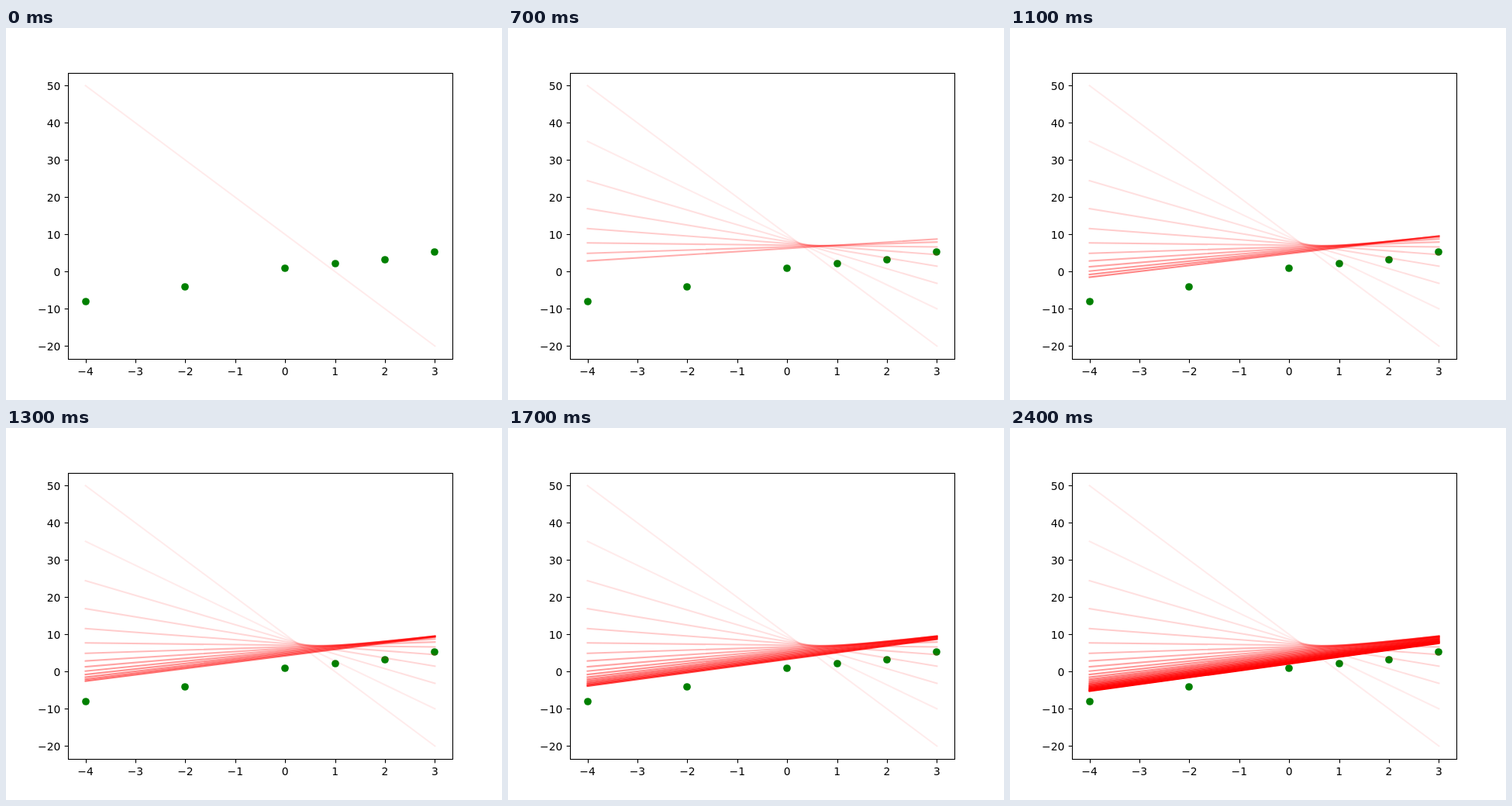
Recreate the animation shown at these times as an HTML page. Size 640x480 px, loop 2500 ms.

```html
<!DOCTYPE html>
<html lang="en">
<head>
<meta charset="utf-8">
<title>Line fit by gradient descent</title>
<style>
  html, body { margin: 0; width: 100%; height: 100%; overflow: hidden; background: #fff; }
  svg { display: block; width: 640px; height: 480px; }
  text { font: 13.89px "DejaVu Sans", sans-serif; }
  .axis { fill: none; stroke: #000; stroke-width: 1.11; }
  .fit { stroke: #f00; stroke-width: 2.083; stroke-linecap: square; }
</style>
</head>
<body>
<svg id="plot" viewBox="0 0 640 480"></svg>
<script>
const STEPS = 25, STEP_MS = 100, RATE = 0.01;
const points = [[-4, -8], [-2, -4], [0, 1], [1, 2.2], [2, 3.2], [3, 5.2]];
const plot = document.getElementById('plot');

const px = x => 80 + (x + 4.35) * 496 / 7.7;
const py = y => 427.2 - (y + 23.5) * 4.8;
const snap = v => Math.round(v) + 0.5;

function add(tag, attrs, text) {
  const el = document.createElementNS('http://www.w3.org/2000/svg', tag);
  for (const key in attrs) el.setAttribute(key, attrs[key]);
  if (text !== undefined) el.textContent = text;
  return plot.appendChild(el);
}

const label = (n, x, y, anchor) =>
  add('text', { x, y, 'text-anchor': anchor }, String(n).replace('-', '\u2212'));

for (const [x, y] of points) {
  add('circle', { cx: Math.round(px(x)), cy: Math.round(py(y)), r: 4.86, fill: '#008000' });
}

// One pass over all points, updating slope and intercept after each
function train([a, b]) {
  for (const [x, y] of points) {
    const err = a * x + b - y;
    a -= RATE * err * x;
    b -= RATE * err;
  }
  return [a, b];
}

const fits = [];
for (let i = 0, model = [-10, 10]; i < STEPS; i++, model = train(model)) {
  const [a, b] = model;
  fits.push(add('line', {
    class: 'fit',
    x1: px(-4), y1: py(b - 4 * a),
    x2: px(3), y2: py(b + 3 * a),
    // the starting line is painted twice
    'stroke-opacity': i ? (i + 1) / STEPS : 1 - 0.96 ** 2
  }));
}

for (let x = -4; x <= 3; x++) {
  add('path', { class: 'axis', d: `M${snap(px(x))} 427.5v4.86` });
  label(x, px(x), 448, 'middle');
}
for (let y = -20; y <= 50; y += 10) {
  add('path', { class: 'axis', d: `M80.5 ${snap(py(y))}h-4.86` });
  label(y, 70.3, Math.round(py(y) + 5.3), 'end');
}
add('rect', { class: 'axis', x: 80.5, y: 58.5, width: 496, height: 369 });

function draw() {
  const step = Math.floor(performance.now() / STEP_MS) % STEPS;
  fits.forEach((line, i) => line.setAttribute('visibility', i <= step ? 'visible' : 'hidden'));
  requestAnimationFrame(draw);
}
draw();
</script>
</body>
</html>
```
